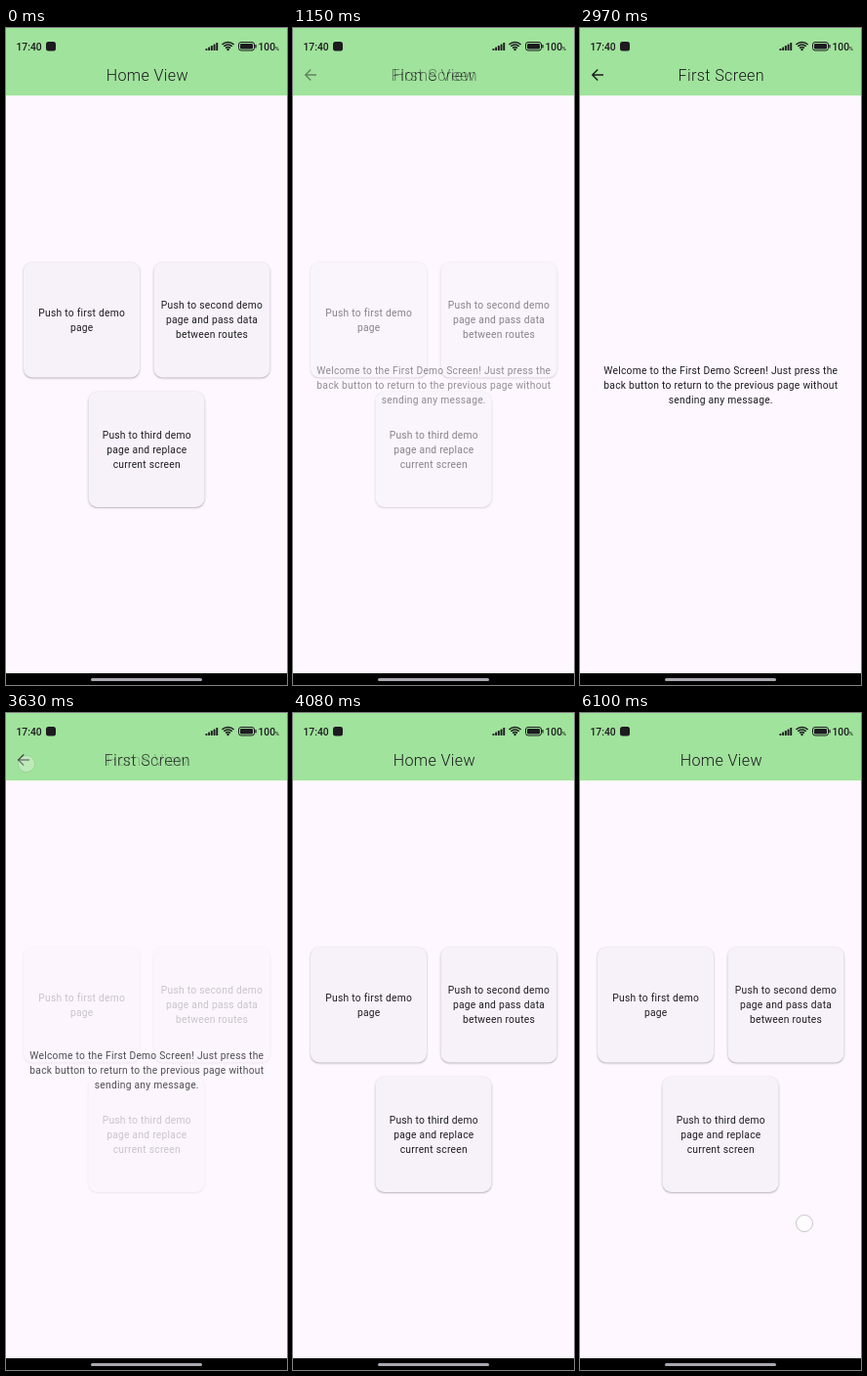
Animation of 288 by 672 pixels, one loop 6140 ms. Source, as an HTML page with a canvas:

```html
<!DOCTYPE html>
<html lang="en">
<head>
<meta charset="utf-8">
<title>Route demo</title>
<style>
  html, body { margin: 0; width: 100%; height: 100%; overflow: hidden; background: #fef7ff; }
  canvas { display: block; }
</style>
</head>
<body>
<canvas id="stage" width="288" height="672"></canvas>
<script>
const W = 288, H = 672, LOOP = 6140;
const INK = '#1d1b20', GREEN = '#a0e39c', PAPER = '#fef7ff', CARD = '#f7f2fa';
const stage = document.getElementById('stage').getContext('2d');

const ramp = (t, from, to) => Math.min(1, Math.max(0, (t - from) / (to - from)));

function layer(paint) {
  const canvas = document.createElement('canvas');
  canvas.width = W;
  canvas.height = H;
  paint(canvas.getContext('2d'));
  return canvas;
}

function text(c, str, x, y, { size = 10.27, weight = 400, spacing = 0.26, align = 'center' } = {}) {
  c.font = `${weight} ${size}px Roboto, sans-serif`;
  c.letterSpacing = spacing + 'px';
  c.textAlign = align;
  c.fillStyle = INK;
  c.fillText(str, x, y);
}

function lines(c, rows, x, y) {
  rows.forEach((row, i) => text(c, row, x, y + i * 15));
}

function roundRect(c, x, y, w, h, r, color) {
  c.beginPath();
  c.roundRect(x, y, w, h, r);
  c.fillStyle = color;
  c.fill();
}

function page(c, title) {
  c.fillStyle = PAPER;
  c.fillRect(0, 0, W, H);
  c.fillStyle = GREEN;
  c.fillRect(0, 0, W, 69);
  text(c, title, 144.8, 53.5, { size: 16.13, weight: 300, spacing: 0.37 });
}

function card(c, x, y) {
  c.save();
  c.shadowColor = 'rgba(50, 45, 65, 0.4)';
  c.shadowBlur = 2;
  c.shadowOffsetY = 0.8;
  roundRect(c, x, y, 119, 118, 9, CARD);
  c.restore();
}

const home = layer(c => {
  page(c, 'Home View');
  card(c, 18, 239.5);
  card(c, 151.5, 239.5);
  card(c, 84.5, 372);
  lines(c, ['Push to first demo', 'page'], 77.7, 294.5);
  lines(c, ['Push to second demo', 'page and pass data', 'between routes'], 211, 287);
  lines(c, ['Push to third demo', 'page and replace', 'current screen'], 144.3, 420);
});

const firstScreen = layer(c => {
  page(c, 'First Screen');
  c.strokeStyle = INK;
  c.lineWidth = 1.4;
  c.beginPath();
  c.moveTo(24, 48);
  c.lineTo(13, 48);
  c.moveTo(18.2, 42.5);
  c.lineTo(12.7, 48);
  c.lineTo(18.2, 53.5);
  c.stroke();
  lines(c, [
    'Welcome to the First Demo Screen! Just press the',
    'back button to return to the previous page without',
    'sending any message.'
  ], 144.3, 353.5);
});

const systemBars = layer(c => {
  const label = { size: 10.3, weight: 500, spacing: 0, align: 'left' };
  text(c, '17:40', 10.5, 22.5, label);
  roundRect(c, 41, 14, 10, 9.5, 2.5, INK);

  for (let i = 0; i < 5; i++) {
    const h = 2 + i * 1.5;
    roundRect(c, 204.5 + i * 2.7, 23 - h, 1.9, h, 0.6, INK);
  }

  c.strokeStyle = INK;
  c.lineWidth = 1.5;
  for (const r of [3.4, 6, 8.6]) {
    c.beginPath();
    c.arc(227.5, 23, r, -Math.PI * 0.75, -Math.PI * 0.25);
    c.stroke();
  }
  c.beginPath();
  c.arc(227.5, 22, 1.2, 0, Math.PI * 2);
  c.fill();

  c.lineWidth = 1;
  c.beginPath();
  c.roundRect(238.5, 14.5, 16, 8.5, 2.5);
  c.stroke();
  roundRect(c, 240, 16, 13, 5.5, 1.2, INK);
  roundRect(c, 255.3, 17, 1.3, 3.5, 0.6, INK);
  text(c, '100', 258.5, 22.5, label);
  text(c, '%', 275.5, 22.5, { ...label, size: 6 });

  c.fillStyle = '#000';
  c.fillRect(0, 660, W, 12);
  roundRect(c, 87, 665, 114, 3, 1.5, '#aca8b2');
});

const touches = [
  { x: 85, y: 320, on: 820, off: 940, fade: 80 },
  { x: 21, y: 52, on: 3380, off: 3540, fade: 180 },
  { x: 230, y: 522, on: 6040, off: LOOP, fade: 1 }
];

function show(image, alpha = 1) {
  if (alpha <= 0) return;
  stage.globalAlpha = alpha;
  stage.drawImage(image, 0, 0);
  stage.globalAlpha = 1;
}

function drawTouch({ x, y, on, off, fade }, t) {
  if (t < on || t >= off + fade) return;
  stage.globalAlpha = 1 - ramp(t, off, off + fade);
  stage.beginPath();
  stage.arc(x, y, 8.5, 0, Math.PI * 2);
  stage.fillStyle = 'rgba(255, 255, 255, 0.6)';
  stage.fill();
  stage.strokeStyle = 'rgba(120, 120, 120, 0.4)';
  stage.lineWidth = 1;
  stage.stroke();
  stage.globalAlpha = 1;
}

function draw(t) {
  show(home);
  show(firstScreen, ramp(t, 1010, 1310) - ramp(t, 3560, 3860));
  show(systemBars);
  touches.forEach(touch => drawTouch(touch, t));
}

const start = performance.now();
function tick() {
  draw((performance.now() - start) % LOOP);
  requestAnimationFrame(tick);
}
tick();
</script>
</body>
</html>
```
